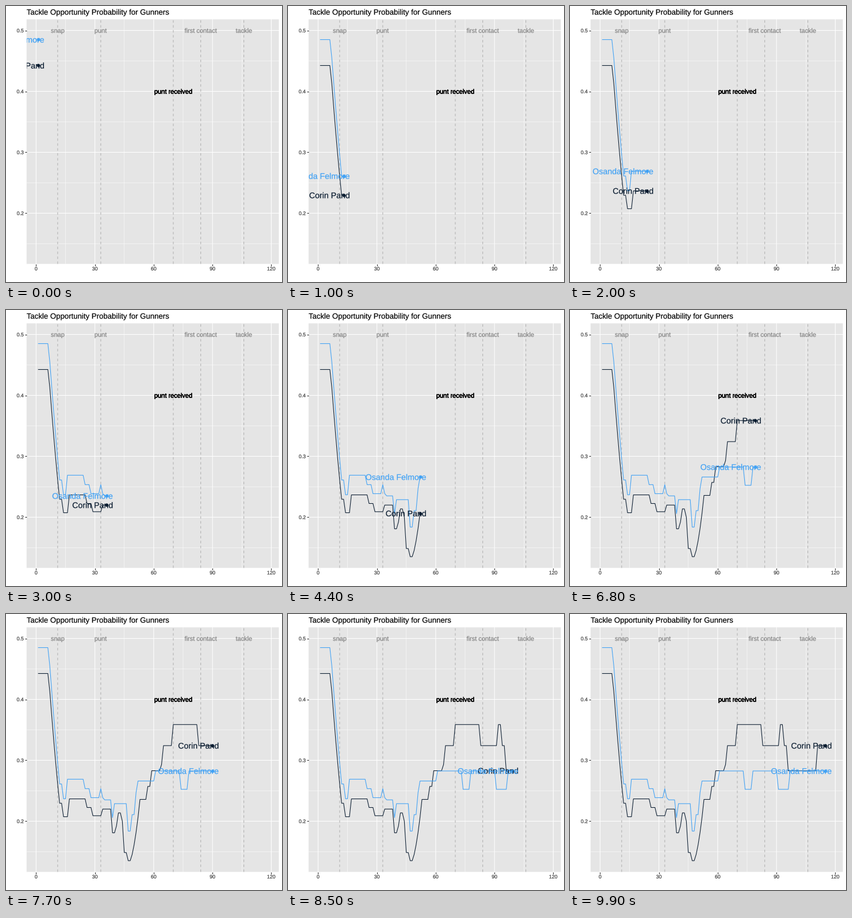
A matplotlib script for the animation above (10 s loop, 480 px wide and 480 px high).

```python
import matplotlib.pyplot as plt
import numpy as np
from matplotlib.animation import FuncAnimation
from matplotlib.patches import PathPatch
from matplotlib.textpath import TextPath
from matplotlib.transforms import Affine2D, ScaledTranslation

SIZE, DPI = 480, 72
FRAMES, INTERVAL = 100, 100
LAST = 115
LEFT, RIGHT, TOP, BOTTOM = 35.8, 474.5, 23.2, 448.5
XLIM, YLIM = (-4.85, 123.85), (0.1168, 0.5183)
PX = (YLIM[1] - YLIM[0]) / (BOTTOM - TOP)  # data height of one pixel
PX_X = (XLIM[1] - XLIM[0]) / (RIGHT - LEFT)
THIN, THICK = 0.53, 1.07
ALIGN = {"left": 0, "center": 0.5, "right": 1}

plt.rcParams.update({
    "font.family": "Liberation Sans",
    "path.snap": False,
    "toolbar": "None",
})

T = np.arange(1, LAST + 1)


# Building blocks for the log-odds curves.
def after(a):
    return 1.0 * (T >= a)


def during(a, b):
    return after(a) - after(b + 1)


def ramp(a, b, power=1):
    return np.clip((T - a) / (b - a), 0, 1) ** power


def opening(odds, lag):
    """Both players react alike at first, one slightly later."""
    return (odds - .98 * ramp(6.3, 12) - .13 * during(14, 15 + lag)
            + .04 * after(16 + lag)
            - .08 * (after(25 + lag) + after(28 + lag)))


def probability(odds):
    return 1 / (1 + np.exp(-odds))


dark = (opening(-.231, 1) + .065 * after(34)
        - .244 * during(39, 40) - .17 * during(41, 41)
        - .037 * after(42) - .083 * after(44)
        - .36 * after(45) - .11 * after(47)
        + .68 * ramp(48, 53, 1.3) + .115 * after(57) + .131 * after(59)
        + .195 * (ramp(63, 65, 2) - during(96, 110))
        + .154 * (during(70, 82) + during(92, 93)))
blue = (opening(-.06, 0) + .08 * during(33, 33) - .02 * after(35)
        - .17 * during(39, 39) - .035 * after(40)
        - .276 * during(47, 48) - .105 * during(49, 50)
        + .2 * ramp(50, 52) + .083 * after(61)
        - .154 * (during(74, 77) + during(91, 96)))

PLAYERS = [("Corin Pand", "#0a1c30", probability(dark)),
           ("Osanda Felmore", "#41a2f5", probability(blue))]
EVENTS = [(11, "snap"), (33, "punt"), (70, None),
          (84, "first contact"), (106, "tackle")]

fig = plt.figure(figsize=(SIZE / DPI, SIZE / DPI), dpi=DPI, facecolor="white")
ax = fig.add_axes([LEFT / SIZE, 1 - BOTTOM / SIZE,
                   (RIGHT - LEFT) / SIZE, (BOTTOM - TOP) / SIZE],
                  facecolor="#e5e5e5")
ax.set(xlim=XLIM, ylim=YLIM)
ax.set_xticks(range(0, 121, 30))
ax.set_yticks([.2, .3, .4, .5])
ax.tick_params(length=2.75, width=THICK, color="#222222",
               labelbottom=False, labelleft=False)
for spine in ax.spines.values():
    spine.set_visible(False)


class Label:
    """Text as outlines, so it can sit between whole pixels."""

    def __init__(self, owner, text, size, color, align="center", z=5):
        path = TextPath((0, 0), text, size=size)
        box = path.get_extents()
        shift = box.x0 + ALIGN[align] * box.width
        self.base = (Affine2D().translate(-shift, -0.36 * size).scale(1 / 72)
                     + fig.dpi_scale_trans)
        self.patch = PathPatch(path, fc=color, ec=color, lw=0.2, zorder=z)
        self.move(0, 0)
        owner.add_artist(self.patch)

    def move(self, x, y):
        self.patch.set_transform(
            self.base + ScaledTranslation(x, y, ax.transData))
        return self


Label(fig, "Tackle Opportunity Probability for Gunners", 13.2, "black",
      "left").move(XLIM[0] + .3 * PX_X, YLIM[1] + 12.9 * PX)
for x in range(0, 121, 30):
    Label(fig, str(x), 8.8, "#393939").move(x, YLIM[0] - 8.2 * PX)
for y in (.2, .3, .4, .5):
    Label(fig, f"{y:.1f}", 8.8, "#393939",
          "right").move(XLIM[0] - 5.3 * PX_X, y)

for x in range(0, 121, 15):
    ax.axvline(x, color="white", lw=THIN if x % 30 else THICK, zorder=1)
for i in range(3, 11):
    ax.axhline(i / 20, color="white", lw=THIN if i % 2 else THICK, zorder=1)

for x, name in EVENTS:
    ax.axvline(x, color="#b1b1b1", lw=THICK, ls=(0, (4, 4)), zorder=2)
    if name:
        Label(ax, name, 11, "#808080").move(x, .5)
# Stacked copies harden the edges of this label.
for _ in range(3):
    Label(ax, "punt received", 11, "black").move(70, .4)

parts = []
for i, (name, color, values) in enumerate(PLAYERS):
    line, = ax.plot([], [], color=color, lw=THICK, zorder=3 + i / 10,
                    solid_capstyle="butt", solid_joinstyle="round")
    dot = ax.scatter([0], [0], s=5.7 ** 2, color=color, lw=0,
                     zorder=4 + i / 10)
    tag = Label(ax, name, 14.2, color, "right", 6 + i / 10)
    parts.append((line, dot, tag, values))
ax.set(xlim=XLIM, ylim=YLIM)


def update(frame):
    n = round(1 + (LAST - 1) * frame / (FRAMES - 1))
    for line, dot, tag, values in parts:
        y = values[n - 1]
        line.set_data(T[:n], values[:n])
        dot.set_offsets([(n, y)])
        tag.move(n + 3, y)
    return [a for line, dot, tag, _ in parts for a in (line, dot, tag.patch)]


anim = FuncAnimation(fig, update, frames=FRAMES, interval=INTERVAL,
                     repeat=True, repeat_delay=0, blit=False)
plt.show()
```
